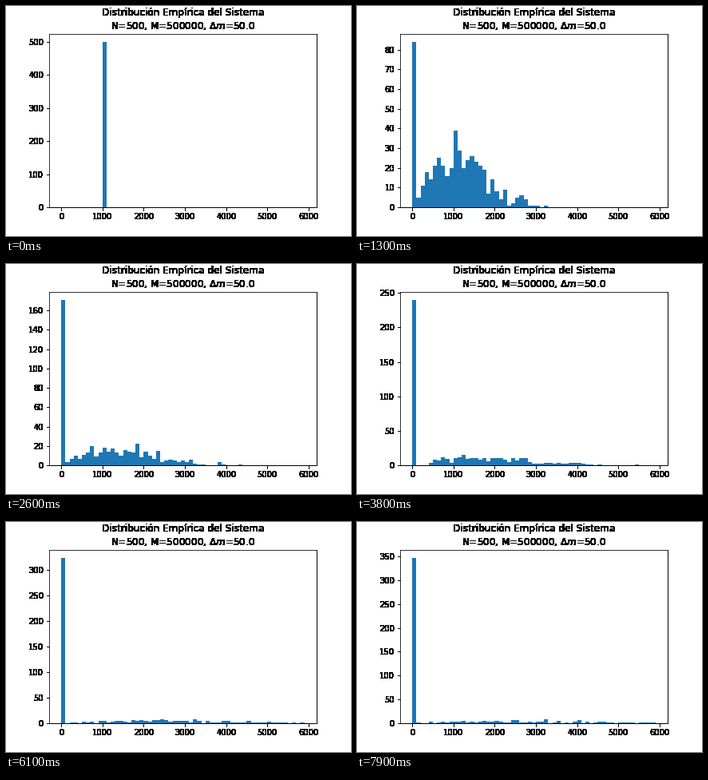
A matplotlib script for the animation above (8 s loop, 432 by 288 pixels).

```python
import numpy as np
import matplotlib.pyplot as plt
from matplotlib.animation import FuncAnimation

FRAMES, AGENTS, MONEY, UNIT, WIDTH = 80, 500, 500000, 50, 100
EDGES = np.arange(0, 6000, WIDTH)
TITLE = "Distribución Empírica del Sistema\nN=500, M=500000, $\\Delta m$=50.0"

# Growth of the number of ruined agents, as a few points in time
RUIN_TIME = [3, 7, 13, 26, 38, 46, 61, 79]
RUINED = [0, 23, 84, 171, 240, 275, 324, 347]


def simulate(seed=7):
    """Yield everyone's wealth: random trades, the poorest drop out for good."""
    rng = np.random.default_rng(seed)
    rich = np.full(AGENTS, MONEY / AGENTS)
    for t in range(FRAMES):
        if t:
            n = len(rich)
            step = rng.normal(0, 195 * (AGENTS / n) ** 0.65, n)
            rich = np.sort(rich + step - step.mean())
            alive = AGENTS - round(np.interp(t, RUIN_TIME, RUINED))
            rich = WIDTH + np.abs(rich[n - alive:] - WIDTH)
            rich *= MONEY / rich.sum()
        shown = np.maximum(np.round(rich / UNIT) * UNIT, WIDTH)
        yield np.pad(shown, (AGENTS - len(rich), 0))


def harden(img, dpi):
    """Turn every touched pixel solid black, without smooth edges."""
    out = np.zeros_like(img)
    out[..., 3] = img[..., 3] > 0
    return out, 0, 0


counts = [np.histogram(wealth, EDGES)[0] for wealth in simulate()]

plt.rcParams.update({"font.family": "DejaVu Sans", "font.size": 10})
fig = plt.figure(figsize=(6, 4), dpi=72, facecolor="white")
ax = fig.add_axes((0.125, 0.125, 0.775, 0.755))
title = ax.set_title(TITLE, fontsize=12)
bars = ax.bar(EDGES[:-1], counts[0], WIDTH, align="edge", color="C0")
ax.set_xlim(-295, 6195)

for part in (title, ax.xaxis, ax.yaxis, ax.spines["right"], ax.spines["bottom"]):
    part.set_agg_filter(harden)


def update(i):
    for bar, n in zip(bars, counts[i]):
        bar.set_height(n)
    ax.set_ylim(0, counts[i].max() * 1.05)
    return list(bars)


anim = FuncAnimation(fig, update, frames=FRAMES, interval=100,
                     repeat=True, repeat_delay=0, blit=False)
plt.show()
```
